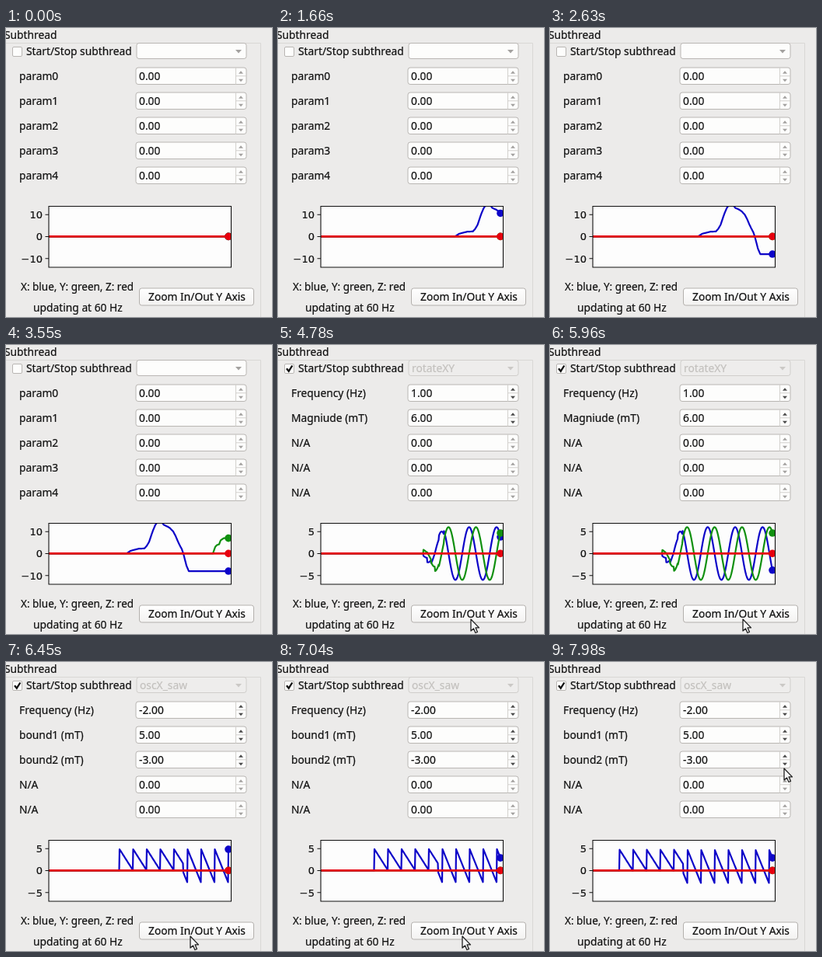
An HTML page that plays this animation: 342x372 px, repeating every 8 s.

```html
<!DOCTYPE html>
<html lang="en">
<head>
<meta charset="utf-8">
<title>Subthread panel</title>
<style>
  html, body { margin: 0; width: 100%; height: 100%; overflow: hidden; background: #ecebea; }
  svg { display: block; width: 342px; height: 372px; }
  text { font: 13.8px "Noto Sans", "Open Sans", sans-serif; fill: #111; stroke: #111; stroke-width: 0.2; white-space: pre; }
  .tick { font: 13px "DejaVu Sans", sans-serif; text-anchor: end; }
  .legend { font-size: 13.5px; }
  .box { fill: #fdfdfc; stroke: #b9b6b3; }
  .line { fill: none; stroke-width: 2.2; stroke-linejoin: round; }
  .line.top { stroke-width: 2.6; }
  .arrow { fill: #a3a19f; }
  .on .arrow { fill: #4a4a4a; }
  .off .box { fill: #eeedec; stroke: #d0cecb; }
  .off text { fill: #c3c1be; stroke: #c3c1be; }
  .off .arrow { fill: #cbc9c6; }
</style>
</head>
<body>
<svg viewBox="0 0 342 372">
  <defs>
    <clipPath id="axes"><rect x="55" y="229" width="234.2" height="79"/></clipPath>
    <linearGradient id="face" x2="0" y2="1">
      <stop stop-color="#fff"/><stop offset="1" stop-color="#f3f2f1"/>
    </linearGradient>
  </defs>
  <rect width="342" height="372" fill="#ecebea"/>
  <path d="M0 19.5H327.5V372" fill="none" stroke="#d9d7d5"/>
  <text x="-2" y="14">Subthread</text>

  <rect class="box" x="8.5" y="24.5" width="12" height="12" rx="1.5"/>
  <path id="check" d="M11 30.3l2.8 3.4 4.6-7.2" fill="none" stroke="#111" stroke-width="2.3"/>
  <text x="26" y="35">Start/Stop subthread</text>
  <g id="combo">
    <rect class="box" x="168" y="19.5" width="141" height="20" rx="3"/>
    <text id="mode" x="172" y="35"></text>
    <path class="arrow" d="M295 28h8l-4 4.5z"/>
  </g>
  <g id="rows"></g>

  <rect x="55" y="229.5" width="234.5" height="78.5" fill="#fdfdfd"/>
  <g clip-path="url(#axes)" id="plot"></g>
  <path d="M55 229.5h234.5V308H55zM50.5 240.3H55M50.5 268.5H55M50.5 296.7H55" fill="none" stroke="#111" stroke-width="1.1"/>
  <text class="tick" id="hi" x="47" y="245"></text>
  <text class="tick" x="47" y="273.2">0</text>
  <text class="tick" id="lo" x="47" y="301.5"></text>

  <text class="legend" x="19" y="338">X: blue, Y: green, Z: red</text>
  <text x="35" y="365">updating at 60 Hz</text>
  <rect id="button" x="171.5" y="335" width="147" height="22" rx="3" fill="url(#face)" stroke="#b3b0ad"/>
  <text x="183" y="351">Zoom In/Out Y Axis</text>
  <path id="cursor" d="M0.5 0.5V15.5L4 12.4 6.4 18 9 16.9 6.6 11.4H11Z" fill="#f6f6f6" stroke="#222" stroke-width="1.3" stroke-linejoin="round"/>
</svg>
<script>
const $ = id => document.getElementById(id);
const NS = 'http://www.w3.org/2000/svg';
function add(parent, tag, attrs) {
  const el = document.createElementNS(NS, tag);
  for (const k in attrs) el.setAttribute(k, attrs[k]);
  return parent.appendChild(el);
}

const LOOP = 8, LEFT = 55, HEAD = 286, ZERO = 268.4;

// Linear interpolation through [position, value] pairs
function along(pts, u) {
  if (u <= pts[0][0]) return pts[0][1];
  for (let i = 1; i < pts.length; i++) {
    const [a, p] = pts[i - 1], [b, q] = pts[i];
    if (u < b) return p + (q - p) * (u - a) / (b - a);
  }
  return pts[pts.length - 1][1];
}

const handX = [[155, 0], [160, 1.2], [164, 1.6], [171, 2.2], [178, 2.3], [181, 3.5], [184, 5.3],
  [187, 8.5], [189, 10.5], [192, 13], [195, 14.4], [200, 14.3], [203, 13], [208, 12.2], [211, 11.5],
  [215, 10], [218, 8], [221, 5.5], [223, 4], [226, 2], [228, 0], [232, -5.5], [235, -8]];
const handY = [[266, 0], [269, 3], [271, 3.8], [274, 4.2], [276, 6], [280, 7]];

// Rotating field whose magnitude is stepped up from 1 to 6
const magnitude = u => u < 187 ? 0 : u > 213 ? 6 : Math.min(5, 1 + Math.floor((u - 187) / 5));
const angle = u => (u - 281) / 35.3 * 2 * Math.PI;

function saw(u) {
  if (u < 124) return 0;
  const high = 4.85, low = u < 206 ? 0 : -2.85, phase = (u - 124) / 17.5 % 1;
  return high + (low - high) * phase;
}

const blank = ['param0', 'param1', 'param2', 'param3', 'param4'].map(p => [p, '0.00', false]);
const none = ['N/A', '0.00', false];

// ref: time at which curve position equals screen x; speed in px/s
const scenes = [
  { start: 0, ref: 3.55, speed: 38.4, mode: '', rows: blank,
    x: u => along(handX, u), y: u => along(handY, u), zoomAt: 99 },
  { start: 3.9, ref: 4.78, speed: 36.4, mode: 'rotateXY',
    rows: [['Frequency (Hz)', '1.00', true], ['Magniude (mT)', '6.00', true], none, none, none],
    x: u => magnitude(u) * Math.cos(angle(u)), y: u => magnitude(u) * Math.sin(angle(u)), zoomAt: 4.5,
    mouse: [[3.9, 302, 98], [4.28, 247.5, 352.5]] },
  { start: 6.4, ref: 7.04, speed: 37.2, mode: 'oscX_saw',
    rows: [['Frequency (Hz)', '-2.00', true], ['bound1 (mT)', '5.00', true], ['bound2 (mT)', '-3.00', true], none, none],
    x: saw, y: () => 0, zoomAt: 0,
    mouse: [[7.2, 236.5, 352.5], [7.6, 304, 100], [7.88, 300.5, 136.5]] }
];

const rows = blank.map((_, i) => {
  const g = add($('rows'), 'g', { transform: `translate(0 ${i * 32})` });
  const label = add(g, 'text', { x: 17, y: 67 });
  add(g, 'rect', { class: 'box', x: 167, y: 51, width: 142, height: 21.5, rx: 3 });
  add(g, 'path', { d: 'M295.5 51V72.5M296 61.8H309', stroke: '#d2d0cd' });
  const value = add(g, 'text', { x: 171, y: 67 });
  add(g, 'path', { class: 'arrow', d: 'M299 58.7h6l-3-3.5zM299 65.8h6l-3 3.5z' });
  return { g, label, value };
});

const traces = ['#0d05c8', '#10900f', '#e6000e'].map((color, i) => ({
  line: add($('plot'), 'path', { class: i === 2 ? 'line top' : 'line', stroke: color }),
  dot: add($('plot'), 'circle', { cx: HEAD, r: 4.8, fill: color })
}));

let shown;
function setScene(s) {
  if (s === shown) return;
  shown = s;
  $('mode').textContent = s.mode;
  $('combo').setAttribute('class', s.mode ? 'off' : '');
  $('check').style.display = s.mode ? '' : 'none';
  $('cursor').style.display = s.mouse ? '' : 'none';
  s.rows.forEach(([label, value, on], i) => {
    rows[i].label.textContent = label;
    rows[i].value.textContent = value;
    rows[i].g.setAttribute('class', on ? 'on' : '');
  });
}

function drawTrace({ line, dot }, fn, shift, scale) {
  const y = x => (ZERO - fn(x + shift) * scale).toFixed(2);
  let d = '';
  for (let x = LEFT; x <= HEAD; x += 0.5) d += (d ? 'L' : 'M') + x + ' ' + y(x);
  line.setAttribute('d', d);
  dot.setAttribute('cy', y(HEAD));
}

const ease = k => k * k * (3 - 2 * k);
function mouseAt(keys, t) {
  let [, x, y] = keys[0];
  for (let i = 1; i < keys.length; i++) {
    const [a, x0, y0] = keys[i - 1], [b, x1, y1] = keys[i];
    if (t < a) break;
    const k = ease(Math.min(1, (t - a) / (b - a)));
    x = x0 + (x1 - x0) * k;
    y = y0 + (y1 - y0) * k;
  }
  return `translate(${x} ${y})`;
}

function render(t) {
  const s = scenes.filter(c => t >= c.start).pop();
  setScene(s);
  const zoomed = t >= s.zoomAt, scale = zoomed ? 5.66 : 2.83;
  $('hi').textContent = zoomed ? '5' : '10';
  $('lo').textContent = zoomed ? '−5' : '−10';
  $('button').setAttribute('fill', Math.abs(t - s.zoomAt + 0.03) < 0.06 ? '#dcdad8' : 'url(#face)');
  const shift = (t - s.ref) * s.speed;
  [s.x, s.y, () => 0].forEach((fn, i) => drawTrace(traces[i], fn, shift, scale));
  if (s.mouse) $('cursor').setAttribute('transform', mouseAt(s.mouse, t));
}

let began;
function tick(now) {
  began ??= now;
  render((now - began) / 1000 % LOOP);
  requestAnimationFrame(tick);
}
render(0);
requestAnimationFrame(tick);
</script>
</body>
</html>
```
